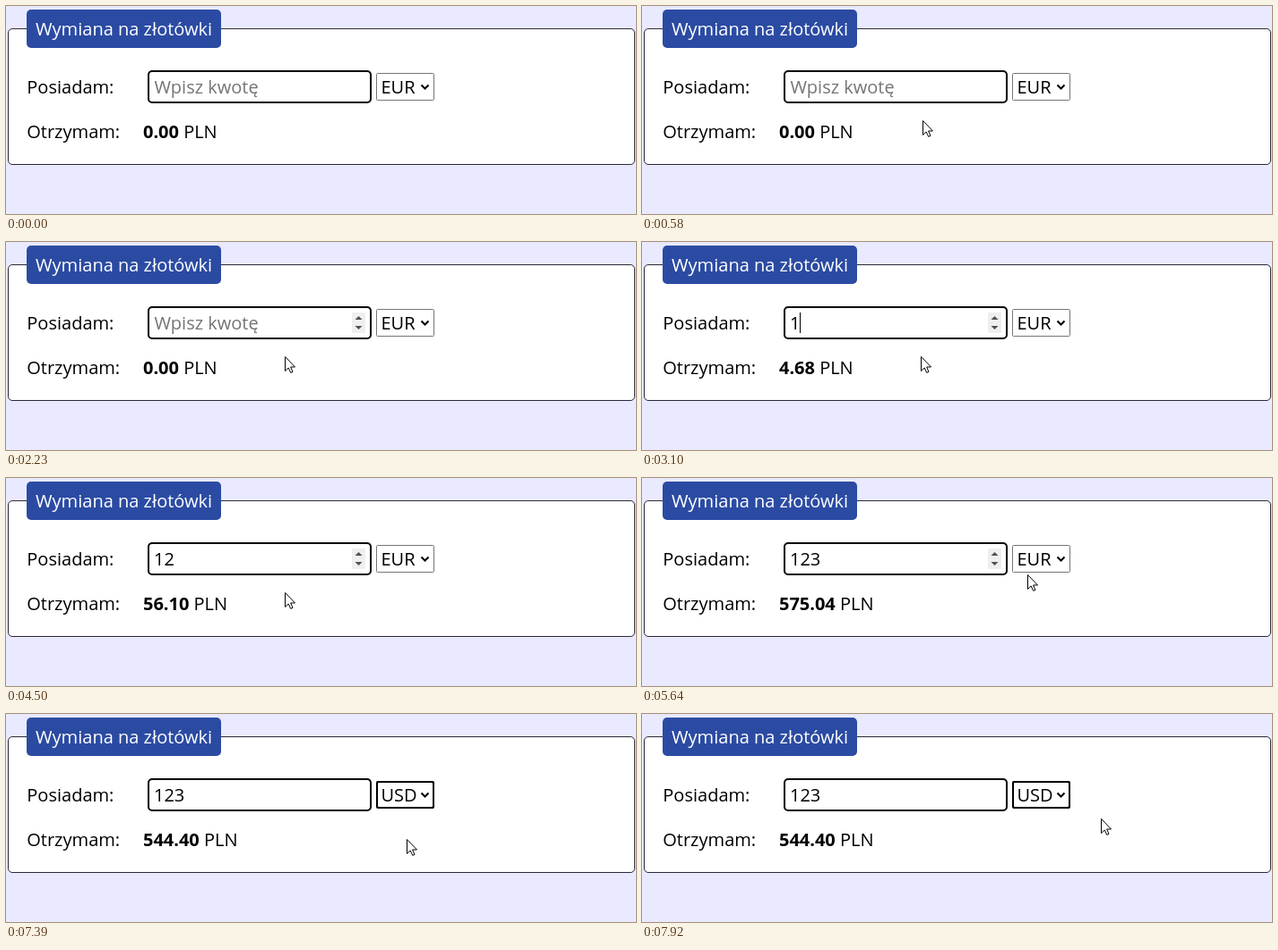
Write an HTML page that moves like this. It is 703 by 233 pixels and loops after 7.99 s.

```html
<!DOCTYPE html>
<html lang="pl">
<head>
<meta charset="utf-8">
<title>Wymiana na złotówki</title>
<style>
  html, body { margin: 0; width: 100%; height: 100%; overflow: hidden; background: #e9e9ff; }
  svg { display: block; width: 100%; height: 100%; }
  text { font: 20px "Open Sans", "Noto Sans", sans-serif; fill: #000; }
  .bold { font-weight: 700; }
  .hint { fill: #757575; }
  .light { fill: #fff; }
  .off { visibility: hidden; }
  #select { stroke: #767676; }
  #select.active { stroke: #101010; }
  #popup { filter: drop-shadow(0 1px 3px rgba(0, 0, 0, .5)); }
</style>
</head>
<body>
<svg viewBox="0 0 703 233">
  <rect x="2.5" y="25.5" width="699" height="152" rx="4.5" fill="#fff" stroke="#2b2838"/>
  <rect x="23" y="4" width="217" height="43" rx="5" fill="#2b4ba3"/>
  <text class="light" x="33" y="33">Wymiana na złotówki</text>

  <text x="23.3" y="98">Posiadam:</text>
  <rect x="159" y="73" width="248" height="35" rx="4" fill="#fff" stroke="#000" stroke-width="2"/>
  <text id="hint" class="hint" x="165.5" y="98">Wpisz kwotę</text>
  <text id="amount" x="165" y="98"></text>
  <rect id="caret" y="79" width="1" height="23"/>
  <g id="spinner">
    <rect x="386" y="79" width="15" height="23" fill="#efefef"/>
    <path d="M389.5 87L393.5 83L397.5 87ZM389.5 94L393.5 98L397.5 94Z" fill="#505050"/>
  </g>

  <rect id="select" x="413.5" y="75.5" width="64" height="30" rx="1" fill="#fff"/>
  <rect id="ring" x="414" y="76" width="63" height="29" rx="2" fill="none" stroke="#000" stroke-width="2"/>
  <text id="currency" x="418.5" y="98">EUR</text>
  <path d="M463.5 88.5L467.5 92.5L471.5 88.5" fill="none" stroke="#000" stroke-width="2"/>

  <text x="23.3" y="148">Otrzymam:</text>
  <text x="153" y="148"><tspan id="sum" class="bold">0.00</tspan> PLN</text>

  <g id="popup">
    <rect x="413.5" y="106.5" width="64" height="113" fill="#fff" stroke="#767676"/>
    <rect id="mark" x="414" width="63" height="28" fill="#1e90ff"/>
    <text class="option" x="418.5" y="128">EUR</text>
    <text class="option" x="418.5" y="156">USD</text>
    <text class="option" x="418.5" y="184">CHF</text>
    <text class="option" x="418.5" y="212">GBP</text>
  </g>

  <g id="cursor">
    <path id="arrow" d="M.5 .5V16.5L4.2 13L6.7 18.4L9 17.4L6.6 12H11.5Z" fill="#fff" stroke="#000"/>
    <path id="beam" d="M-3.5 -7.5H-1L0 -6.5L1 -7.5H3.5M0 -6.5V6.5M-3.5 7.5H-1L0 6.5L1 7.5H3.5" fill="none" stroke="#000"/>
  </g>
</svg>
<script>
  const LOOP = 7990;
  const ENTER = 250, HOVER = 720, CLICK = 1740, TYPE = 3100, OPEN = 5910, CLOSE = 7390;
  const KEY_GAP = 930, BLINK = 465, ROW = 28;
  const RATES = { EUR: 4.6751, USD: 4.426 };

  // Pointer glides; "bend" is the control point of a curved one
  const START = [456, 204];
  const GLIDES = [
    { from: ENTER, until: 1040, to: [317, 87], bend: [213, 90] },
    { from: 1040, until: 1310, to: [317, 93] },
    { from: 1840, until: 2230, to: [311, 128] },
    { from: 5430, until: 5700, to: [439, 92], bend: [432, 133] },
    { from: 6440, until: 6850, to: [447, 140] },
    { from: 7600, until: 7920, to: [512, 117] }
  ];

  const $ = id => document.getElementById(id);
  const show = (id, on) => $(id).classList.toggle('off', !on);
  const clamp = (v, a, b) => Math.min(b, Math.max(a, v));
  const within = (v, a, b) => v >= a && v < b;
  const options = document.querySelectorAll('.option');

  function cursorAt(t) {
    let pos = START;
    for (const { from, until, to, bend } of GLIDES) {
      const p = clamp((t - from) / (until - from), 0, 1), q = 1 - p;
      pos = pos.map((a, i) => {
        const mid = bend ? bend[i] : (a + to[i]) / 2;
        return q * q * a + 2 * p * q * mid + p * p * to[i];
      });
    }
    return pos.map(Math.round);
  }

  function drawField(t) {
    const typed = clamp(Math.floor((t - TYPE) / KEY_GAP) + 1, 0, 3);
    const value = '123'.slice(0, typed);
    const currency = t < CLOSE ? 'EUR' : 'USD';
    $('amount').textContent = value;
    $('currency').textContent = currency;
    $('sum').textContent = (value * RATES[currency]).toFixed(2);
    show('hint', !typed);
    show('spinner', within(t, HOVER, OPEN));

    // The caret restarts its blinking at the click and at each key
    const since = t - (typed ? TYPE + KEY_GAP * (typed - 1) : CLICK);
    show('caret', within(t, CLICK, 5840) && Math.floor(since / BLINK) % 2 === 0);
    $('caret').setAttribute('x', Math.floor(165 + 11.42 * typed));
  }

  function drawCursor(t, [x, y]) {
    const beam = within(x, 158, 408) && within(y, 72, 109);
    show('arrow', t >= ENTER && !beam);
    show('beam', t >= ENTER && beam);
    $('cursor').setAttribute('transform', `translate(${beam ? x + .5 : x} ${y})`);
  }

  function drawSelect(t, y) {
    const picked = y >= 107 + ROW ? 1 : 0;
    $('select').classList.toggle('active', t >= OPEN);
    show('ring', t >= CLOSE);
    show('popup', within(t, OPEN, CLOSE));
    $('mark').setAttribute('y', 107 + ROW * picked);
    options.forEach((o, i) => o.classList.toggle('light', i === picked));
  }

  function draw(now) {
    const t = now % LOOP, pos = cursorAt(t);
    drawField(t);
    drawCursor(t, pos);
    drawSelect(t, pos[1]);
    requestAnimationFrame(draw);
  }
  draw(0);
</script>
</body>
</html>
```
